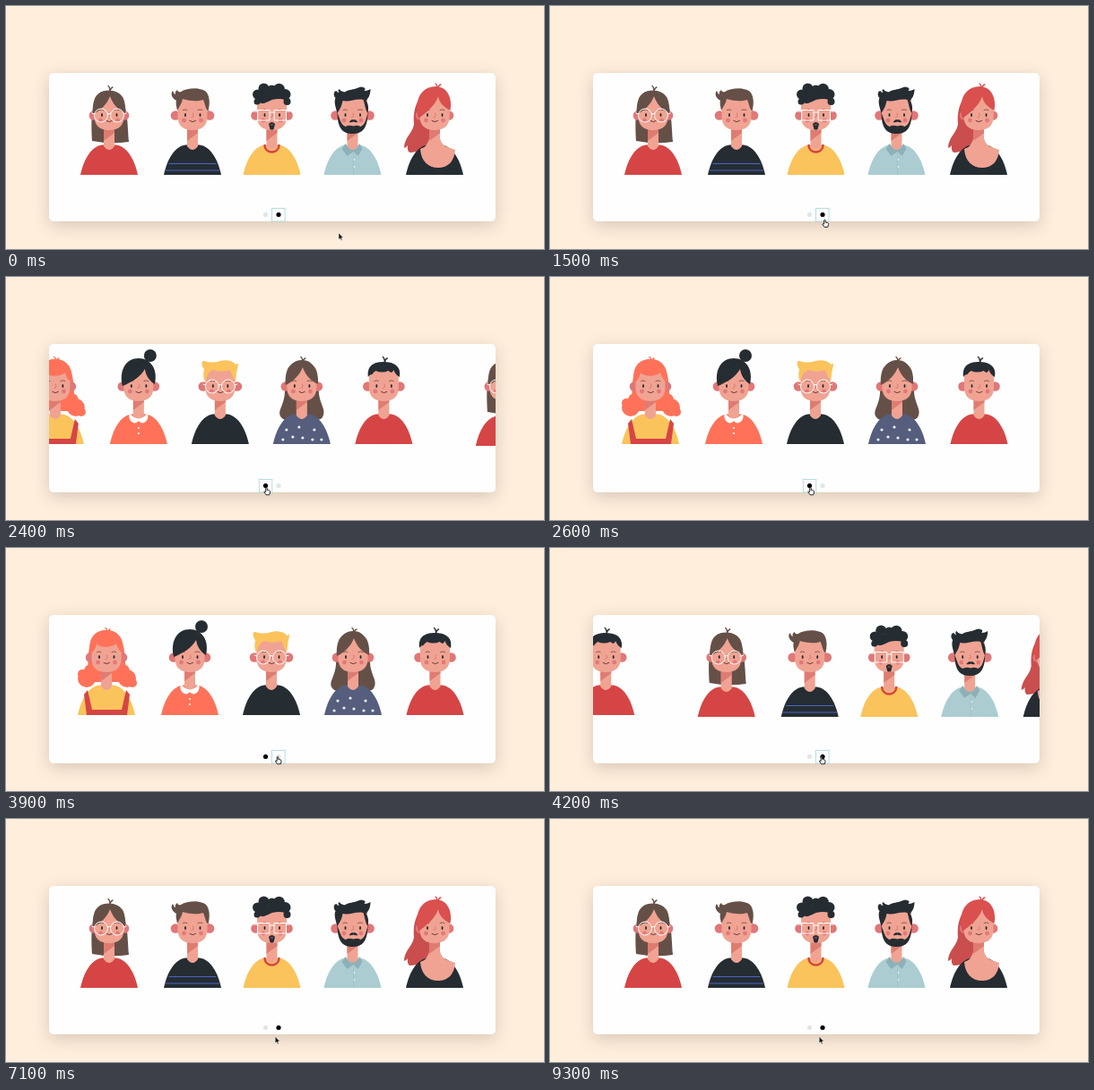
Animation of 600 by 272 pixels, one loop 9400 ms. Source, as an HTML page:

```html
<!DOCTYPE html>
<html lang="en">
<head>
<meta charset="utf-8">
<title>Avatar carousel</title>
<style>
html, body { margin: 0; width: 100%; height: 100%; overflow: hidden; background: #ffeedc; }
#card { position: absolute; left: 48px; top: 75px; width: 498px; height: 166px; border-radius: 5px;
  background: #fefefe; box-shadow: 0 5px 18px rgba(70, 55, 45, .21); }
svg { position: absolute; left: 0; top: 0; }
</style>
</head>
<body>
<div id="card"></div>
<svg width="600" height="272" viewBox="0 0 600 272">
  <clipPath id="clip"><rect x="48" y="75" width="498" height="166" rx="5"/></clipPath>
  <g clip-path="url(#clip)"><g id="track"></g></g>
  <circle id="dot1" cx="289.5" cy="233.5" r="2.6"/>
  <circle id="dot2" cx="304" cy="233.5" r="2.6"/>
  <rect id="focus" y="226.5" width="14.5" height="14.5" fill="none" stroke="#a5d8d5" stroke-width=".8"/>
  <g id="cursor" stroke-linejoin="round">
    <path id="arrow" d="M0 0V7.6L1.7 6.1 2.8 8.6 4 8 2.9 5.6H5.2Z" fill="#111" stroke="#fff" stroke-width=".5"/>
    <path id="hand" d="M-.8 .6Q0-.4 .7.6V3L3 3.4Q4.3 3.8 4 5.4L3.3 8.3H-.4L-2.6 5.3Q-2.7 4-.8 5Z" fill="#fff" stroke="#111" stroke-width=".9"/>
  </g>
</svg>
<script>
const $ = id => document.getElementById(id);
const SKIN = '#f0a392', SHADE = '#de7c72', EAR = '#e07778', DARK = '#252d33', BROWN = '#655048',
  RED = '#d64545', CORAL = '#ff7259', YELLOW = '#fbc35b', NAVY = '#555e7c', GINGER = '#d9504f',
  WINE = '#cb4e4e', AQUA = '#abcdd2';

const fill = (d, c) => `<path d="${d}" fill="${c}"/>`;
const line = (d, c, w = 1) => `<path d="${d}" fill="none" stroke="${c}" stroke-width="${w}" stroke-linecap="round"/>`;
const disc = (x, y, r, c) => `<circle cx="${x}" cy="${y}" r="${r}" fill="${c}"/>`;
const discs = (list, c) => list.map(([x, y, r]) => disc(x, y, r, c)).join('');
const tuft = c => line('M1 96Q1 91-1 89.5M1 95Q2 91.500 4 91', c, 1.4);
const parted = c => fill('M0 94.500C-15 94-19 106-18 121C-9 117-2 109 1 101C4 109 9 116 18 120C19 104 14 95 0 94.500Z', c) + tuft(c);
const roundGlasses = [-9, 9].map(x => `<circle cx="${x}" cy="122.500" r="7.500" fill="none" stroke="#fff"/>`).join('')
  + line('M-1.500 121Q0 119.500 1.500 121M-16.500 121L-19 120M16.500 121L19 120', '#fff');

const TORSO = 'M-32 189C-28 170-19 157-8 155.500H8C19 157 28 170 32 189Z';
const NECK = fill('M-6 134V157Q0 165 6 157V134Z', SKIN) + fill('M-6 136H6V142L-6 151Z', SHADE);
const FACE = fill('M-16.500 106C-16.500 99-10 98 0 98S16.500 99 16.500 106V124C16.500 134 10 139 0 139S-16.500 134-16.500 124Z', SKIN);
const FEATURES = discs([[-9.5, 128, 2.4], [9.5, 128, 2.4]], '#e2787a')
  + `<g fill="${DARK}"><ellipse cx="-8" cy="122" rx="1" ry="2"/><ellipse cx="8.5" cy="122" rx="1" ry="2"/></g>`
  + line('M-10.500 116.500Q-8 115-6 116.500M6 116.500Q8.500 115 11 116.500', '#6b4a44', .8)
  + line('M.5 120Q2.500 124-1 124.500', '#d4736a', .9);
const SMILE = line('M-3 128.500Q0 131 3.500 128.500', '#5b3030', .9);

function person({ x, shirt, back = '', wear = '', hair, ear = 18, mouth = SMILE, lift = 0 }) {
  const ears = disc(-ear, 122.5, 5.3, EAR) + disc(ear, 122.5, 5.3, EAR);
  return `<g transform="translate(${x})">${back}<g transform="translate(0 ${-lift})">`
    + `${fill(TORSO, shirt)}${NECK}${wear}</g>${ears}${FACE}${FEATURES}${mouth}${hair}</g>`;
}

const first = [
  { x: 112, shirt: YELLOW,
    back: fill('M-20 150C-22 115-20 92 0 92S22 115 21 150Z', CORAL)
      + discs([[-22, 146, 10], [23, 146, 10], [-17, 138, 8], [18, 138, 8], [-27, 141, 5], [29, 151, 5]], CORAL),
    wear: fill('M-21 161L-16 183H17L22 161 26 166 23 189H-22L-25 166Z', RED),
    hair: fill('M-18 118C-21 101-13 92 0 92S21 102 18 118C14 115 12 111 11 107C5 112-7 112-11 107C-12 112-14 116-18 118Z', CORAL) + tuft(CORAL) },
  { x: 205, shirt: CORAL,
    wear: fill('M-10 154C-13 163-4 169 0 163C4 169 13 163 10 154Q0 167-10 154Z', '#fff') + discs([[0, 171, 1], [0, 177, 1]], '#fff'),
    hair: disc(13, 88, 7, DARK)
      + fill('M-18 122C-22 104-14 91 0 91S22 104 18 120C12 116 8 110 7 103C2 112-8 118-18 122Z', DARK) },
  { x: 296, shirt: DARK, ear: 19,
    hair: fill('M-17 117C-20 110-18 106-18 103C-22 98-20 93-18 94Q-8 97 0 94C8 92 16 95 17 98Q19 98 20 96Q20 101 19 103C18 108 18 111 17 117C14 113 13 108 11 104C2 107-4 105-8 104C-14 106-15 112-17 117Z', YELLOW) + roundGlasses },
  { x: 387, shirt: NAVY,
    back: fill('M0 93C-18 93-18 115-19 130C-20 145-28 150-23 157C-18 163-8 161-5 155H8C12 161 22 162 24 155C27 148 19 140 19 128C18 112 17 93 0 93Z', BROWN),
    wear: discs([[-17, 173, 1.6], [-3, 170, 1.6], [14, 173, 1.6], [1, 182, 1.6], [-21, 184, 1.6], [-10, 181, 1.6], [22, 184, 1.6], [12, 184, 1.6]], '#eef0f5'),
    hair: parted(BROWN) },
  { x: 478.5, shirt: RED,
    hair: fill('M-17.500 112C-19 98-10 95 0 95S20 99 17.500 112C14 110 12 107 11 104Q10 107 8 107L5 105Q-2 108-9 105Q-12 107-13 109Q-16 109-17.500 112Z', DARK) + tuft(DARK) }
];

const second = [
  { x: 115, shirt: RED, ear: 17,
    back: fill('M-19 151C-20 130-22 95 0 95S20 130 22 152Q2 155-19 151Z', BROWN),
    hair: parted(BROWN) + roundGlasses },
  { x: 208, shirt: DARK, ear: 19,
    wear: line('M-26 176.500H26M-30 184H30', '#4c63c4', 1.2),
    hair: fill('M-17 117C-18 112-19 109-18 106C-23 103-25 98-22 95Q-21 98-19 99Q-20 96-17 94Q-16 97-13 96C-5 91 11 91 16 97C20 103 19 112 17.500 118C15 116 14 110 12 105C3 108-6 105-11 104C-12 109-14 111-17 117Z', BROWN) },
  { x: 296.5, shirt: YELLOW,
    wear: line('M-8 156C-7 166 7 166 8 156', RED, 2.6),
    mouth: fill('M-3.500 132Q0 128 3.500 132L2 138Q0 139-2 138Z', DARK) + line('M-1 133H1', '#d9736c', .8),
    hair: fill('M-17 97H17V105Q3 102-4 107-9 110-17 108Z', DARK)
      + discs([[-16, 99, 5.5], [-9, 92.5, 6], [0, 94, 5.5], [8, 93, 6.3], [15, 99, 6], [17, 107, 4], [-16.5, 107, 3.5], [-10, 104, 5]], DARK)
      + line('M-15.500 116.500H-2.500V128H-15.500ZM3 116.500H16V128H3ZM-2.500 119H3M-15.500 118H-20M16 118H20', '#fff') },
  { x: 386.5, shirt: AQUA, ear: 19,
    wear: fill('M-8 154L-12 160-6 168 1 163 6 168 11 160 8 154Q0 168-8 154Z', '#8eb1b8') + line('M1 165V189', '#9bc0c6', .7) + discs([[2, 172, .8], [2, 180, .8]], '#fff'),
    mouth: fill('M-17 119C-17 138-10 143 0 143S17 138 17 119C15 127 14 133 9 135Q5 133 1 134.500Q-4 133-8 135C-13 133-14 127-17 119Z', DARK)
      + fill('M-4 130Q-1 126 1 127.500Q3 126 6 130Q3 130.500 1 129.500Q-1 130.500-4 130Z', DARK),
    hair: fill('M-17 120C-19 113-21 107-19 103C-22 100-21 95-18 95Q-17 97-15 97Q-17 94-15 93Q-12 97-8 96C-4 93 1 94 5 92Q10 89 14 92Q14 94 13 95Q17 95 20 93C20 100 17 104 15 106C18 110 18 115 17 120C14 116 14 110 12 105C4 103-4 108-11 106C-12 112-14 115-17 120Z', DARK) },
  { x: 478, shirt: DARK, ear: 16,
    back: fill('M-6 95C-22 102-24 120-23 132C-24 142-34 147-34 159Q-31 158-30 156Q-31 161-28 164C-18 164-8 159-5 147C-4 140-4 130-6 120Z', WINE),
    wear: fill('M-6 148C-7 156-11 158-16 160C-15 174-7 181 4 181S22 174 23 161C16 158 8 158 6 148Z', SKIN)
      + fill('M-6 140V151L6 142V136Z', SHADE),
    hair: fill('M-18 126C-23 108-17 90 2 90C15 91 20 104 17.500 117C10 113 5 108 4 101C1 111-8 118-18 126Z', GINGER) + line('M3 92Q3 88 1 87M4 91Q5 88 7 88', GINGER, 1.3) }
];

const WIDTH = 498, LOOP = 9400;
$('track').innerHTML = `<g transform="translate(${-WIDTH})">${first.map(p => person({ ...p, lift: 2 })).join('')}</g>`
  + second.map(person).join('');

// cubic-bezier(.25, .1, .25, 1), solved by bisection
function ease(x) {
  if (x <= 0 || x >= 1) return x <= 0 ? 0 : 1;
  let lo = 0, hi = 1, s;
  for (let i = 0; i < 24; i++) {
    s = (lo + hi) / 2;
    if (.75 * s * (1 - s) + s ** 3 < x) lo = s; else hi = s;
  }
  return .3 * s * (1 - s) ** 2 + 3 * s * s * (1 - s) + s ** 3;
}

const PATH = [[0, 371, 254], [1000, 371, 254], [1700, 290.5, 235.5], [2900, 290.5, 235.5],
  [3500, 303, 233.5], [6100, 303, 233.5], [6700, 300.2, 243.5], [LOOP, 300.2, 243.5]];

function pointer(t) {
  const i = PATH.findIndex(k => k[0] > t);
  const [t0, x0, y0] = PATH[i - 1], [t1, x1, y1] = PATH[i];
  const u = (t - t0) / (t1 - t0), s = u * u * (3 - 2 * u);
  return [x0 + (x1 - x0) * s, y0 + (y1 - y0) * s];
}

function draw(now) {
  const t = Math.floor(now % LOOP / 100) * 100; // ten pictures a second
  const shift = WIDTH * (ease((t - 2100) / 500) - ease((t - 3932) / 500));
  $('track').setAttribute('transform', `translate(${shift})`);

  const onFirst = t >= 2100 && t < 3932;
  $('dot1').setAttribute('fill', onFirst ? '#000' : '#e4e4e4');
  $('dot2').setAttribute('fill', onFirst ? '#e4e4e4' : '#000');
  $('focus').setAttribute('x', t >= 2000 && t < 3900 ? 282.3 : 296.6);
  $('focus').style.display = t < 7000 ? '' : 'none';

  const [x, y] = pointer(t), over = x > 282 && x < 312 && y < 241;
  $('cursor').setAttribute('transform', `translate(${x} ${y})`);
  $('hand').style.display = over ? '' : 'none';
  $('arrow').style.display = over ? 'none' : '';
}

const start = performance.now();
(function tick() {
  draw(performance.now() - start);
  requestAnimationFrame(tick);
})();
</script>
</body>
</html>
```
